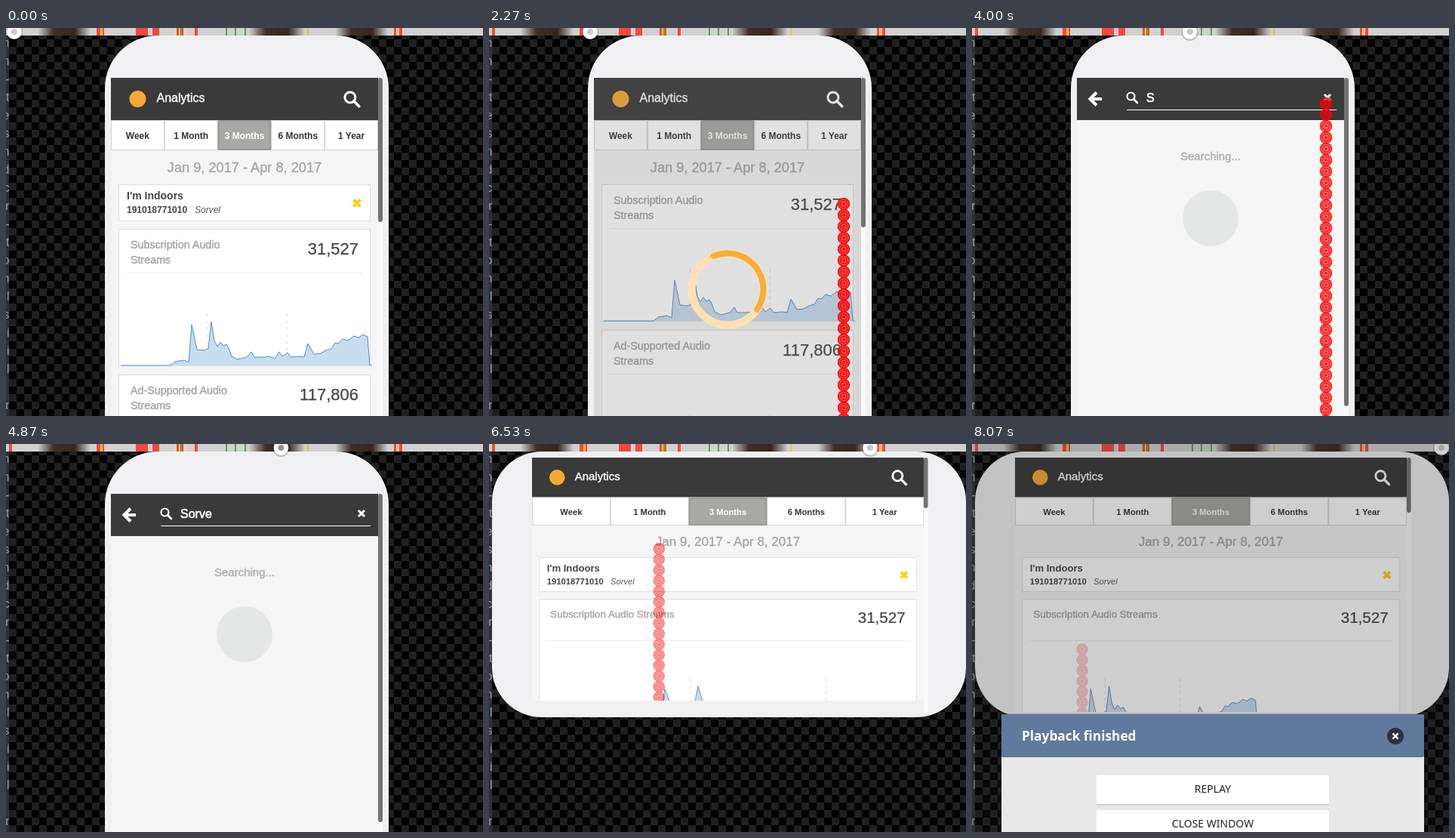
These frames come from a looping animation (632x514 px, 8140 ms). An HTML page:

```html
<!DOCTYPE html>
<html lang="en">
<head>
<meta charset="utf-8">
<title>Session playback</title>
<style>
html, body { margin: 0; width: 100%; height: 100%; overflow: hidden; background: #000; }
svg { display: block; width: 632px; height: 514px; font-family: "Liberation Sans", Arial, sans-serif; }
.modal { font-family: "Noto Sans", "Open Sans", sans-serif; }
</style>
</head>
<body>
<svg id="stage" viewBox="0 0 632 514"></svg>
<script>
const LOOP = 8140;
const SONG = "I'm Indoors", ARTIST = 'Sorvel';
const NS = 'http://www.w3.org/2000/svg';
const svg = document.getElementById('stage');

function el(parent, tag, attrs = {}, text) {
  const node = document.createElementNS(NS, tag);
  set(node, attrs);
  if (text !== undefined) node.textContent = text;
  return parent.appendChild(node);
}
function set(node, attrs) {
  for (const k in attrs) node.setAttribute(k, attrs[k]);
}
const group = (p, attrs) => el(p, 'g', attrs);
const rect = (p, x, y, width, height, fill, more) => el(p, 'rect', { x, y, width, height, fill, ...more });
const circle = (p, cx, cy, r, fill, more) => el(p, 'circle', { cx, cy, r, fill, ...more });
const path = (p, d, stroke, width, more) => el(p, 'path', { d, stroke, fill: 'none', 'stroke-width': width, ...more });
const label = (p, x, y, size, fill, text, more) => el(p, 'text', { x, y, 'font-size': size, fill, ...more }, text);
const show = (node, on) => node.setAttribute('display', on ? 'inline' : 'none');
const clamp = (v, a = 0, b = 1) => Math.min(b, Math.max(a, v));
const MID = { 'text-anchor': 'middle' }, END = { 'text-anchor': 'end' }, BOLD = { 'font-weight': 700 };
const heavy = (stroke, width = .4) => ({ stroke, 'stroke-width': width });

// Linear interpolation through [time, value] pairs
function track(points, t) {
  for (let i = 1; i < points.length; i++) {
    const [t0, a] = points[i - 1], [t1, b] = points[i];
    if (t <= t1) return a + (b - a) * clamp((t - t0) / (t1 - t0));
  }
  return points[points.length - 1][1];
}

// ---- Backdrop
const defs = el(svg, 'defs');
const checks = el(defs, 'pattern', { id: 'checks', x: 4, y: 15, width: 20, height: 20, patternUnits: 'userSpaceOnUse' });
rect(checks, 0, 0, 20, 20, '#000');
rect(checks, 10, 0, 10, 10, '#202020');
rect(checks, 0, 10, 10, 10, '#202020');
const dusk = el(defs, 'linearGradient', { id: 'dusk' });
[[0, 0], [.3, .95], [.7, 1], [1, 0]].forEach(([offset, o]) =>
  el(dusk, 'stop', { offset, 'stop-color': '#35271f', 'stop-opacity': o }));

rect(svg, 0, 0, 632, 514, 'url(#checks)');
rect(svg, 0, 0, 4, 514, '#2c3234');
const edgeClip = el(defs, 'clipPath', { id: 'edge' });
rect(edgeClip, 0, 0, 4, 514);
const edge = group(svg, { 'clip-path': 'url(#edge)' });
[...'nn-tesndcr-tohlsiil r'].forEach((c, i) =>
  label(edge, 4.5, 25 + i * 24, 16, '#9a9fa1', c, END));

// ---- Timeline
const bar = group(svg);
rect(bar, 0, 0, 632, 10, '#d0d0d0');
[[42, 70], [322, 74], [436, 70]].forEach(([x, w]) => rect(bar, x, 0, w, 10, 'url(#dusk)'));
const RED = '#ee4a42', GREEN = '#55a838', YELLOW = '#f4bd3a';
[[4, 4, RED], [120, 5, RED], [125, 3, YELLOW], [128, 2, RED], [172, 16, RED], [194, 9, RED],
 [226, 3, RED], [229, 2, YELLOW], [231, 2, GREEN], [233, 2, RED], [250, 4, RED], [291, 2, GREEN],
 [303, 2, GREEN], [316, 2, GREEN], [399, 2, YELLOW], [514, 3, RED], [518, 2, YELLOW], [521, 4, RED]]
  .forEach(([x, w, fill]) => rect(bar, x, 0, w, 10, fill));

// ---- Device
const body = rect(svg, 131, 10, 376, 700, '#f0f0f2');
const gutter = rect(svg, 493, 66, 6, 448, '#fafafa');
const thumb = rect(svg, 493, 66, 6, 100, '#737375', { rx: 3 });
const screenClip = el(defs, 'clipPath', { id: 'screen' });
const clipRect = rect(screenClip, 0, 0, 1, 1);
const screen = group(group(svg, { 'clip-path': 'url(#screen)' }));

const lens = (p, x, y, r, w) => {
  circle(p, x - r * .3, y - r * .3, r, 'none', { stroke: '#fff', 'stroke-width': w });
  path(p, `M${x + r * .4} ${y + r * .4}L${x + r * 1.4} ${y + r * 1.4}`, '#fff', w * 1.2, { 'stroke-linecap': 'round' });
};
const cross = (p, x, y, r, color, w) =>
  path(p, `M${x - r} ${y - r}l${2 * r} ${2 * r}M${x + r} ${y - r}l${-2 * r} ${2 * r}`, color, w);

// ---- Charts: x offset and height above the base line
const STREAMS = [[0, 0], [66, 0], [72, 5], [84, 7], [90, 4], [94, 54], [101, 21], [111, 20], [116, 22], [120, 58],
  [124, 33], [128, 25], [132, 31], [136, 26], [140, 28], [143, 23], [147, 12], [155, 8], [167, 11], [173, 18],
  [177, 11], [190, 11], [197, 12], [204, 9], [210, 18], [214, 12], [221, 17], [225, 11], [236, 12], [243, 11],
  [248, 29], [256, 15], [265, 16], [272, 20], [279, 22], [284, 30], [288, 29], [294, 35], [301, 33], [309, 39],
  [315, 37], [321, 41], [327, 38], [330, 0], [333, 0]];
const ADS = [[0, 0], [208, 0], [213, 30], [218, 22], [223, 0], [254, 0], [259, 52], [263, 49], [266, 58],
  [271, 51], [280, 53], [288, 49], [294, 53], [302, 50], [311, 55], [320, 52], [328, 50], [331, 0], [333, 0]];
const LIVELY = [];
for (let x = 0; x < 70; x += 5) LIVELY.push([x, 4 + 1.4 * Math.sin(x * 1.7)]);
LIVELY.push(...STREAMS.slice(2, -2).map(([x, h]) => [x, h * .95 + 3]), [330, 2], [333, 0]);

function drawChart(chart, points, start, scale) {
  const line = points.map(([x, h]) => `${(start + x * scale).toFixed(1)} ${(181 - h).toFixed(1)}`).join('L');
  chart.line.setAttribute('d', 'M' + line);
  chart.area.setAttribute('d', `M${start} 181L${line}L${start + 333 * scale} 181Z`);
  chart.grid.setAttribute('d', [114, 220].map(x => `M${start + x * scale} 112V181`).join(''));
}

function makeCard(parent, W, y, words) {
  const g = group(parent, { transform: `translate(0 ${y})` });
  rect(g, 10.5, .5, W - 21, 181, '#fff', { stroke: '#dedede' });
  const lines = W > 400 ? [words.join(' ')] : words;
  lines.forEach((s, i) => label(g, 26, 26 + i * 20, 14.3, '#a2a2a2', s, heavy('#a2a2a2')));
  path(g, `M21 58.5H${W - 21}`, '#ececec', 1);
  return {
    value: label(g, W - 26, 34, 22, '#444', '', { ...END, ...heavy('#444', .25) }),
    area: el(g, 'path', { fill: '#c8dcf0' }),
    grid: path(g, '', '#dcdcdc', 1, { 'stroke-dasharray': '5 4' }),
    line: path(g, '', '#4f8fc0', 1)
  };
}

function makePage(W) {
  const root = group(screen);
  rect(root, 0, 0, W, 1200, '#f5f5f5');
  rect(root, 0, 0, W, 56, '#3a3a3a');
  circle(root, 35.5, 28, 11, '#f7a834');
  label(root, 60.5, 32, 16, '#fff', 'Analytics', heavy('#fff'));
  lens(root, W - 35, 28, 7, 3);
  const cell = W / 5;
  ['Week', '1 Month', '3 Months', '6 Months', '1 Year'].forEach((s, i) => {
    const on = i === 2;
    rect(root, i * cell + .5, 56.5, cell - 1, 39, '#fff', { stroke: '#d2d2d2' });
    if (on) rect(root, i * cell + 1, 57, cell - 2, 38, '#a8a8a4', { stroke: '#989894', 'stroke-width': 2 });
    label(root, (i + .5) * cell, 81, 12, on ? '#fff' : '#333', s, { ...MID, ...BOLD });
  });
  label(root, W / 2, 125, 18.2, '#a6a6a6', 'Jan 9, 2017 - Apr 8, 2017', { ...MID, ...heavy('#a6a6a6') });

  const song = group(root);
  rect(song, 10.5, 141.5, W - 21, 48, '#fff', { stroke: '#dedede' });
  label(song, 21, 161, 14, '#444', SONG, BOLD);
  label(song, 21, 179, 12, '#444', '191018771010', BOLD);
  label(song, 111, 179, 12, '#555', ARTIST, { 'font-style': 'italic' });
  cross(song, W - 28, 166, 4.5, '#f9d01c', 4);

  const cards = group(root);
  const first = makeCard(cards, W, 200, ['Subscription Audio', 'Streams']);
  const second = makeCard(cards, W, 393, ['Ad-Supported Audio', 'Streams']);

  const loading = group(root);
  rect(loading, 0, 0, W, 600, 'rgba(100,100,100,.2)');
  circle(loading, W / 2, 280, 47.5, 'none', { stroke: '#ffe0b5', 'stroke-width': 10 });
  const arc = path(loading, '', '#f6ae3c', 8, { 'stroke-linecap': 'round' });
  return { W, root, song, cards, first, second, loading, arc };
}
const tall = makePage(354), wide = makePage(554);

// ---- Search view
const search = group(screen);
rect(search, 0, 0, 354, 600, '#f5f5f5');
rect(search, 0, 0, 354, 56, '#3a3a3a');
path(search, 'M33 28H18M26 19.5L17.5 28L26 36.5', '#fff', 4.2);
lens(search, 73, 26, 5, 2.2);
path(search, 'M66 42.5H344', '#fff', 1);
cross(search, 332, 26, 4, '#fff', 3);
const query = label(search, 92, 32, 16, '#fff', '', heavy('#fff', .6));
const busy = group(search);
label(busy, 177, 109, 15, '#aaa', 'Searching...', { ...MID, ...heavy('#aaa', .3) });
circle(busy, 177, 186, 37, '#e5e7e7');

// ---- Touch marks: time and place on the page
const TOUCHES = [[2100, 331, 167], [3270, 330, 34], [5500, 179.5, 129], [6820, 95, 271]];
const marks = TOUCHES.map(([, x, y]) => {
  const g = group(screen);
  for (let cy = y; cy < 520; cy += 15) {
    circle(g, x, cy, 8.2, '#f00', { 'fill-opacity': .55 });
    [7.2, 4.4].forEach(r => circle(g, x, cy, r, 'none', { stroke: '#f00', 'stroke-width': 1.7 }));
    circle(g, x, cy, 2, '#f00');
  }
  return g;
});

const knob = group(svg);
circle(knob, 0, 6, 8, 'none', { stroke: '#000', 'stroke-opacity': .2, 'stroke-width': 6 });
circle(knob, 0, 5, 6.8, 'none', { stroke: '#fff', 'stroke-width': 6 });
circle(knob, 0, 5, 4, 'rgba(200,200,200,.65)');

// ---- Closing dialog
const shade = rect(svg, 0, 0, 632, 514, '#222');
const modal = group(svg, { class: 'modal' });
rect(modal, 38, -1, 562, 300, '#000', { rx: 3, 'fill-opacity': .2 });
rect(modal, 39, 0, 560, 300, '#e8e8e8', { rx: 3 });
rect(modal, 39, 0, 560, 57, '#5f7a9c', { rx: 2 });
label(modal, 66, 35, 17.3, '#fff', 'Playback finished', BOLD);
circle(modal, 561, 29, 11, '#2b333d');
cross(modal, 561, 29, 3.6, '#fff', 2.4);
['REPLAY', 'CLOSE WINDOW'].forEach((s, i) => {
  const y = 81 + i * 46;
  rect(modal, 165, y + 1, 308, 39, '#cfcfcf', { rx: 2 });
  rect(modal, 165, y, 308, 38, '#fff', { rx: 2 });
  label(modal, 319, y + 23, 14, '#222', s, MID);
});

// ---- Timing
const KNOB = [[0, 11], [700, 24], [2270, 134], [2870, 188], [4000, 288.5], [5600, 428], [6530, 505], [7870, 622]];
const SCROLL = [[2660, 0], [2850, 56], [3080, 56], [3240, 0]];
const RISE = [[7870, 514], [8070, 358]];
const CLEARED = 2150, LOADED = 2600, SEARCH = 3340, TYPED = 3850, PICKED = 5480, READY = 6110, TURN = 6330, REFIT = 6900;

function spin(page, t) {
  const p = t < SEARCH ? t - 1634 : t - 5600;
  const tail = 18 + p * .36, len = 16 + 134 * Math.sin(Math.PI * p / 1400) ** 2;
  const at = a => {
    const r = a * Math.PI / 180;
    return `${page.W / 2 + 47.5 * Math.cos(r)} ${280 + 47.5 * Math.sin(r)}`;
  };
  page.arc.setAttribute('d', `M${at(tail)}A47.5 47.5 0 0 1 ${at(tail + len)}`);
}

function render(t) {
  const turned = t >= TURN, refit = t >= REFIT;
  const searching = t >= SEARCH && t < PICKED;
  const noSong = t >= CLEARED && t < SEARCH;
  const fresh = t >= LOADED && t < SEARCH;
  const picked = t >= PICKED && t < READY;
  const loading = picked || (t >= CLEARED && t < LOADED);
  const scroll = track(SCROLL, t);
  const page = turned ? wide : tall;

  if (turned) {
    const bottom = refit ? 355 : 340;
    set(body, { x: 4, y: 10, width: 628, height: 352, rx: 66 });
    set(clipRect, { x: 57, y: 18, width: 519, height: bottom - 18 });
    set(gutter, { x: 576, y: 18, width: 6, height: 337 });
    set(thumb, { x: 576, y: 18, width: 5.6, height: refit ? 73 : 67 });
    set(screen, { transform: 'translate(57 18) scale(.937)' });
  } else {
    const length = searching || picked ? 435 : noSong ? 198 : 191;
    set(body, { x: 131, y: 10, width: 376, height: 700, rx: 70 });
    set(clipRect, { x: 139, y: 66, width: 354, height: 448 });
    set(gutter, { x: 493, y: 66, width: 6, height: 448 });
    set(thumb, { x: 493, y: 66 + scroll * .34, width: 6, height: length });
    set(screen, { transform: `translate(139 ${66 - scroll})` });
  }

  show(tall.root, !turned && !searching);
  show(wide.root, turned);
  show(search, searching);
  show(page.song, !noSong);
  show(page.cards, !picked);
  set(page.cards, { transform: `translate(0 ${noSong ? -59 : 0})` });
  page.first.value.textContent = fresh ? '39,124' : '31,527';
  page.second.value.textContent = fresh ? '121,370' : '117,806';
  const [start, scale] = turned && !refit ? [17.5, 1.811] : [13, 1];
  drawChart(page.first, fresh ? LIVELY : STREAMS, start, scale);
  drawChart(page.second, ADS, start, scale);
  show(page.loading, loading);
  if (loading) spin(page, t);

  query.textContent = t < TYPED ? '' : ARTIST.slice(0, 1 + Math.floor((t - TYPED) / 220));
  show(busy, t >= TYPED);

  marks.forEach((mark, i) => {
    const age = t - TOUCHES[i][0];
    mark.setAttribute('opacity', age < 0 ? 0 : clamp(1 - (age - 650) / 800));
  });

  set(knob, { transform: `translate(${track(KNOB, t)} 0)` });
  shade.setAttribute('opacity', .22 * clamp((t - 7850) / 200));
  set(modal, { transform: `translate(0 ${track(RISE, t)})` });
  show(modal, t > 7870);
}

const begin = performance.now();
function tick() {
  render((performance.now() - begin) % LOOP);
  requestAnimationFrame(tick);
}
tick();
</script>
</body>
</html>
```
